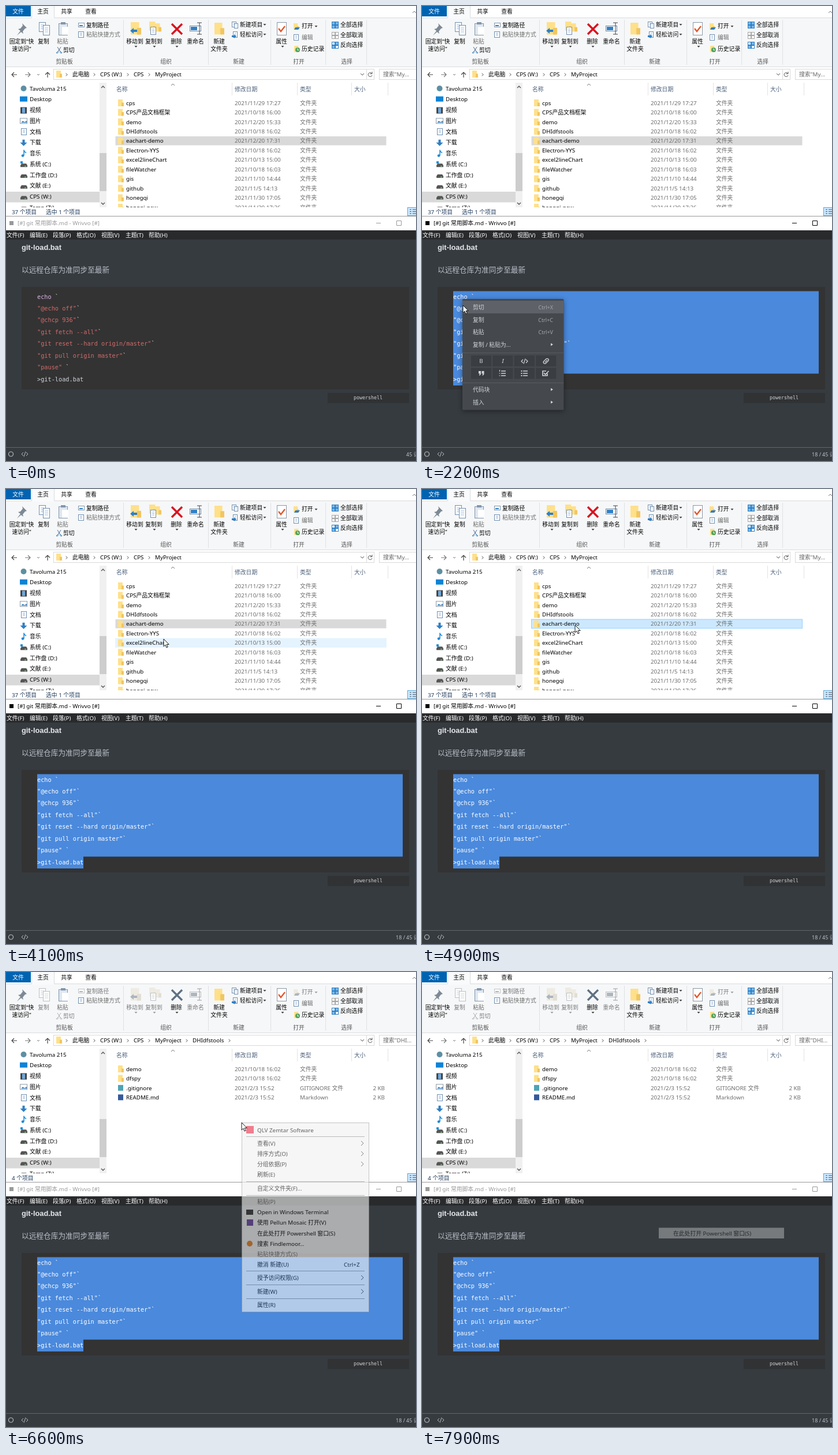
These frames come from a looping animation (710 px wide and 789 px high, 8 s). An HTML page:

```html
<!DOCTYPE html>
<html lang="zh-CN">
<head>
<meta charset="utf-8">
<title>Copy a script into a project folder</title>
<style>
html, body { margin: 0; width: 100%; height: 100%; overflow: hidden; background: #fff; }
svg { display: block; }
text { font: 9.8px "Noto Sans", "Noto Sans CJK SC", sans-serif; white-space: pre; }
.code { font: 10.25px "DejaVu Sans Mono", monospace; }
.lang { font: 8.3px "DejaVu Sans Mono", monospace; }
.head { font: bold 12.8px "Liberation Sans", sans-serif; }
.para { font-size: 12.7px; }
.small { font-size: 9px; }
.off { filter: grayscale(.8); opacity: .5; }
</style>
</head>
<body>
<script>
const LOOP = 8000, ROW = 16.45, LINE = 20.43;
const BLUE = '#2f7fc4', GRAY = '#6d6d6d', MID = 'text-anchor="middle"', END = 'text-anchor="end"';

const R = (x, y, w, h, fill, more = '') => `<rect x="${x}" y="${y}" width="${w}" height="${h}" fill="${fill}" ${more}/>`;
const T = (x, y, s, fill = '#000', more = '') => `<text x="${x}" y="${y + 3.6}" fill="${fill}" ${more}>${s}</text>`;
const P = (d, stroke, w = 1, fill = 'none') => `<path d="${d}" stroke="${stroke}" stroke-width="${w}" fill="${fill}"/>`;
const F = (d, fill) => P(d, 'none', 0, fill);
const C = (x, y, r, fill) => `<circle cx="${x}" cy="${y}" r="${r}" fill="${fill}"/>`;
const G = (id, body, more = '') => `<g id="${id}" ${more}>${body}</g>`;
const caret = (x, y, fill = '#444') => F(`M${x - 2.5} ${y - 1}h5l-2.5 3z`, fill);
const chevron = (x, y, s = 2.5, c = '#555') => P(`M${x - s / 2} ${y - s}l${s} ${s}l${-s} ${s}`, c);
const down = (x, y) => P(`M${x - 3} ${y - 1}l3 3l3 -3`, '#555');
const folder = (x, y, s = 1) => `<g transform="translate(${x} ${y}) scale(${s})">${
  R(0, 0, 8, 12, '#ffe08a')}${R(6, 5.5, 4, 6.5, '#f1c65f')}</g>`;
const page = (x, y, w, h, c = '#6f8fb0') => R(x + .5, y + .5, w, h, '#fff', `stroke="${c}"`) +
  [.3, .5, .7].map(k => P(`M${x + 3} ${y + h * k}h${w - 5}`, '#9dbbe0')).join('');

function ribbon() {
  const label = (x, y, s, c) => T(x, y, s, c, MID);
  const grid = (y, fills) => fills.map((f, i) =>
    R(564.5 + i % 2 * 6, y + (i >> 1) * 6, 5, 5, f, `stroke="${BLUE}"`)).join('');
  const arrow = (x, y) => F(`M${x} ${y}l6 -5v3h6v4h-6v3z`, BLUE);
  return R(0, 0, 710, 20, '#fff') + R(0, 20, 710, 85, '#f6f7f8') +
    P('M0 20.5H44.5V0M83.5 0V20.5H710M0 105.5H710', '#dadbdc') + R(45, 0, 38, 22, '#f9fafb') +
    R(0, 0, 43, 18, '#0063b1') + label(21, 9, '文件', '#fff') + label(64, 9, '主页') +
    label(105, 9, '共享') + label(147, 9, '查看') + P('M704 12l3 -3l3 3', '#777') +
    [203, 350, 458, 553, 624].map(x => P(`M${x + .5} 24V102`, '#e0e1e3')).join('') +
    [[101, '剪贴板'], [277, '组织'], [403, '新建'], [507, '打开'], [590, '选择']].map(([x, s]) => label(x, 96, s, '#555')).join('') +
    F('M28 30l8 8l-3 1l-4 5l1 4l-4 -3l-7 6l6 -8l-4 -3l4 -1l4 -5z', '#7d8995') +
    label(27, 61, '固定到“快') + label(27, 74, '速访问”') +
    R(91.5, 30.5, 15, 20, '#dfe7f0', 'stroke="#8296ad"') + R(95, 28, 8, 4, '#8296ad') + R(97, 36, 11, 14, '#fff') +
    label(98, 61, '粘贴', GRAY) + page(125, 44, 9, 10) + T(139, 49, '粘贴快捷方式', GRAY) +
    G('tools',
      page(57, 28, 11, 16) + page(64, 33, 11, 17) + label(65, 61, '复制') +
      P('M89 71l5 8M95 71l-5 8', '#4c6a88') + P('M87 81a1.8 1.8 0 1 0 3 -2zM94 79a1.8 1.8 0 1 0 3 2z', BLUE) + T(99, 76, '剪切') +
      R(125.5, 29.5, 10, 7, '#fff', 'stroke="#7f96ae"') + P('M127 34h6', BLUE, 2) + T(139, 33, '复制路径') +
      folder(216, 28, 1.8) + arrow(215, 43) + label(223, 61, '移动到') + caret(225, 70) +
      folder(248, 27, 1.3) + folder(257, 30, 1.2) + page(250, 36, 9, 13) + label(256, 61, '复制到') + caret(257, 70) +
      R(318.5, 34.5, 19, 9, '#fff', 'stroke="#6d87a3"') + R(320, 36, 11, 6, BLUE) +
      P('M331 29h8M335 29v20M331 49h8', '#444') + label(328, 61, '重命名') +
      folder(498, 30, .9) + F('M501 37h8l-3 4h-7z', BLUE) + T(512, 34, '打开') + caret(537, 35)) +
    '<path id="cross" d="M287 31L305 49M305 31L287 49" stroke-width="3.4"/>' + label(295, 61, '删除') + caret(296, 70) +
    folder(361, 29, 1.7) + label(369, 61, '新建') + label(369, 74, '文件夹') +
    page(391, 27, 7, 9) + page(395, 30, 6, 8) + T(405, 32, '新建项目') + caret(448, 32) +
    page(393, 44, 7, 10) + F('M391 51h4v-2l4 3.500l-4 3.500v-2h-4z', BLUE) + T(405, 49, '轻松访问') + caret(448, 49) +
    R(469.5, 28.5, 16, 22, '#fff', 'stroke="#8a97a5"') + P('M472 39l4 5l7 -9', '#e2572b', 2.4) + label(477, 61, '属性') + caret(479, 70) +
    page(498, 49, 8, 10) + T(512, 54, '编辑', GRAY) +
    folder(499, 69, .9) + C(505, 76, 4, '#53a35b') + P('M505 73.500v3h2', '#fff') + T(512, 74, '历史记录') +
    grid(27.5, Array(4).fill('#79b8ea')) + T(579, 32, '全部选择') +
    grid(45.5, Array(4).fill('#fff')).replaceAll(BLUE, '#a5a5a5') + T(579, 50, '全部取消') +
    grid(62.5, ['#fff', '#79b8ea', '#79b8ea', '#fff']) + T(579, 67, '反向选择');
}

function addressBar() {
  const crumbs = list => list.map(([x, s]) => T(x, 118, s)).join('');
  return P('M19 119H10M14 115l-4 4l4 4', '#444', 1.2) + P('M33 119h9M38 115l4 4l-4 4', '#777', 1.2) +
    P('M54 118l2 2l2 -2', '#777') + P('M72 124v-9M68 119l4 -4l4 4', '#444', 1.2) +
    R(82.5, 109.5, 555, 18, '#fff', 'stroke="#d9d9d9"') + P('M624.5 110v17', '#d9d9d9') +
    R(646.5, 109.5, 70, 18, '#fff', 'stroke="#d9d9d9"') + folder(87, 112) +
    [105, 153, 211, 248].map(x => chevron(x, 119)).join('') +
    crumbs([[115, '此电脑'], [163, 'CPS (W:)'], [221, 'CPS'], [258, 'MyProject']]) +
    G('crumb', chevron(313, 119) + T(323, 118, 'DHIdfstools') + chevron(387, 119)) +
    down(617, 118) + P('M633.5 117a3.500 3.500 0 1 0 .5 3M634 114v3.500h-3.500', '#555') +
    '<text id="search" x="653" y="121.6" fill="#666"></text>';
}

function tree() {
  const drive = y => F(`M27 ${y - 1}h8l2 3v3h-12v-3z`, '#555') + R(32, y + 3, 3, 1, '#7fe07f');
  const items = [
    ['Tavoluma 215', y => C(30.5, y, 5, '#5d8fa3')],
    ['Desktop', y => R(24, y - 5, 13, 9, '#0a84d8')],
    ['视频', y => R(25, y - 5, 11, 11, '#444') + R(28, y - 4, 5, 9, '#6fa8dc')],
    ['图片', y => R(24.5, y - 4.5, 12, 9, '#fff', 'stroke="#8b9aa8"') + F(`M26 ${y + 3}l3 -3l3 2l4 -2v3z`, BLUE)],
    ['文档', y => page(26, y - 6, 9, 11)],
    ['下载', y => F(`M28.5 ${y - 5}h4v5h4l-6 6l-6 -6h4z`, BLUE)],
    ['音乐', y => C(29, y + 4, 2.3, '#1689d8') + P(`M31 ${y + 4}v-10q0 3 4 5`, '#1689d8', 1.5)],
    ['系统 (C:)', y => R(25, y - 5, 4, 4, '#1689d8') + drive(y)],
    ['工作盘 (D:)', drive], ['文献 (E:)', drive], ['CPS (W:)', drive], ['Temp (Z:)', drive]];
  return R(0, 322, 162, 18.5, '#d9d9d9') +
    items.map(([s, icon], i) => icon(143 + i * 18.75) + T(41, 143 + i * 18.75, s)).join('') +
    R(162, 133, 12, 216, '#f0f0f0') + R(162, 255, 12, 66, '#cdcdcd') +
    P('M165 142l3 -3l3 3M165 341l3 3l3 -3', '#555', 1.4);
}

function fileRow(i, name, date, type = '文件夹', size = '', color) {
  const y = 168 + i * ROW;
  return (color ? R(194, y - 5, 9, 10, color) : folder(194, y - 6)) + T(208, y, name) +
    T(396, y, date, GRAY) + T(509, y, type, GRAY) + T(656, y, size, GRAY, END);
}

function fileList() {
  const project = [['cps', '11/29 17:27'], ['CPS产品文档框架', '10/18 16:00'], ['demo', '12/20 15:33'],
    ['DHIdfstools', '10/18 16:02'], ['eachart-demo', '12/20 17:31'], ['Electron-YYS', '10/18 16:02'],
    ['excel2lineChart', '10/13 15:00'], ['fileWatcher', '10/18 16:03'], ['gis', '11/10 14:44'],
    ['github', '11/5 14:13'], ['honegqi', '11/30 17:05'], ['hongqi-new', '11/30 17:36']];
  return [391, 504, 598, 661].map(x => P(`M${x + .5} 133V155`, '#e3e3e3')).join('') +
    P('M286 138l3 -3l3 3', '#777') +
    [[191, '名称'], [396, '修改日期'], [509, '类型'], [603, '大小']].map(([x, s]) => T(x, 144, s, '#4c607a')).join('') +
    R(189, 0, 470, ROW, '#e5f3ff', 'id="hover"') + R(189.5, 0, 469, ROW - 1, '#d9d9d9', 'id="picked"') +
    G('outer', project.map(([n, d], i) => fileRow(i, n, '2021/' + d)).join('')) +
    G('inner', fileRow(0, 'demo', '2021/10/18 16:02') + fileRow(1, 'dfspy', '2021/10/18 16:02') +
      fileRow(2, '.gitignore', '2021/2/3 15:52', 'GITIGNORE 文件', '2 KB', '#4fa3b5') +
      fileRow(3, 'README.md', '2021/2/3 15:52', 'Markdown', '2 KB', '#34589b'));
}

function editor() {
  const red = s => `<tspan fill="#d26b6b">"${s}"</tspan>`;
  const lines = ['<tspan fill="#dcb4ea">echo</tspan> `', ...['@echo off', '@chcp 936', 'git fetch --all',
    'git reset --hard origin/master', 'git pull origin master'].map(s => red(s) + '`'), red('pause') + ' `', '&gt;git-load.bat'];
  const code = fill => lines.map((s, i) =>
    T(54, 504 + i * LINE, fill ? s.replace(/<.*?>/g, '') : s, fill || '#cfd5db', 'class="code"')).join('');
  const menus = [[1, '文件(F)'], [41, '编辑(E)'], [81, '段落(P)'], [122, '格式(O)'], [165, '视图(V)'], [207, '主题(T)'], [247, '帮助(H)']];
  return R(0, 349, 710, 15, '#fff') + '<text id="count" x="10" y="360.6" fill="#1e395b"></text>' +
    G('chosen', T(69, 357, '选中 1 个项目', '#1e395b')) +
    R(695.5, 349.5, 20, 14, '#cce8ff', 'stroke="#5aa7dc"') +
    P('M699 353h3M699 356.500h3M699 360h3M704 353h6M704 356.500h6M704 360h6', '#456', 1.2) +
    R(0, 364, 710, 25, '#fff') + P('M0 364.5H710', '#999') +
    G('caption', R(6, 373, 7, 7, 'currentColor') + T(20, 376, '[#] git 常用脚本.md - Wrivvo [#]', 'currentColor') +
      P('M641 376.5h8M676.5 372.5h8v8h-8z', 'currentColor')) +
    R(0, 389, 710, 16, '#292a2c') + menus.map(([x, s]) => T(x, 397, s, '#fff')).join('') +
    R(0, 405, 710, 384, '#363b40') +
    T(27, 419, 'git-load.bat', '#e4e7ea', 'class="head"') + T(27, 458.4, '以远程仓库为准同步至最新', '#b8bfc6', 'class="para"') +
    R(27, 487, 671, 178, '#333') + R(557, 671, 141, 17.5, '#303234') +
    T(627, 678.6, 'powershell', '#cfd3d6', 'class="lang" ' + MID) +
    code() + '<clipPath id="clip"><path id="clipShape"/></clipPath><path id="mark" fill="#4a89dc"/>' +
    `<g clip-path="url(#clip)">${code('#fff')}</g>` +
    P('M0 765.5H710', '#62676c') + P('M4.500 777a4 4 0 1 0 8 0a4 4 0 1 0 -8 0', '#b8bfc6', 1.2) +
    P('M30 774l-3 3l3 3M35 774l3 3l-3 3M34 772.500l-3 9', '#b8bfc6') +
    G('words', T(675, 777, '18 /', '#b8bfc6', 'class="small"')) + T(693, 777, '45 词', '#b8bfc6', 'class="small"');
}

function editMenu() {
  const ink = '#d0d4d8', item = (y, s, key) => T(88, y, s, ink) +
    (key ? T(227, y, key, '#a3a7ab', 'class="small" ' + END) : F(`M223 ${y - 2.5}l4 2.500l-4 2.500z`, ink));
  const bars = (x, y) => P([-4, 0, 4].map(d => `M${x - 2} ${y + d}h8`).join(''), ink, 1.5);
  const cells = [0, 1, 2, 3, 4, 5, 6, 7].map(i => R(85 + i % 4 * 37.4, 606 + (i >> 2) * 21.500, 35, 19, '#3a3d41')).join('');
  const dots = P('M171.500 633h2M171.500 637h2M171.500 641h2', ink, 2);
  const digits = P('M134.500 631v3M135.500 637h-2M135.500 641h-2', ink, 1.2);
  return R(70, 508, 175.5, 192.5, '#45494e', 'rx="2" style="filter:drop-shadow(0 2px 4px #0006)"') +
    R(70, 511, 175.5, 22, '#5e6268', 'id="editHover"') +
    item(522, '剪切', 'Ctrl+X') + item(544, '复制', 'Ctrl+C') + item(565, '粘贴', 'Ctrl+V') + item(587, '复制 / 粘贴为...') +
    P('M70 601.5h175M70 653.5h175', '#585c61') + cells +
    T(102.5, 615.5, 'B', ink, MID) + T(140, 615.5, 'I', ink, 'font-style="italic" style="font-style:italic;font-family:Noto Serif,serif" ' + MID) +
    P('M175 613l-3 3l3 3M180 613l3 3l-3 3M179 611.500l-3 9', ink, 1.2) +
    P('M213 618l4 -4M213 614l2 -2a2.300 2.300 0 0 1 3.500 3.500l-2 2M216.500 617.500l-2 2a2.300 2.300 0 0 1 -3.500 -3.500l2 -2', ink, 1.3) +
    F('M98 633h4v5q0 2 -3 3v-1.500q1 -.5 1 -2h-2zM103.500 633h4v5q0 2 -3 3v-1.500q1 -.5 1 -2h-2z', ink) +
    digits + bars(139, 637) + dots + bars(177, 637) +
    P('M217 637v4h-8v-8h6M211 636l2.500 3l6 -6', ink, 1.6) + item(665, '代码块') + item(687, '插入');
}

// label, centre y, then '>' for a submenu, '-' for disabled, or a shortcut
const FOLDER_MENU = [['QLV Zemtar Software', 274], ['查看(V)', 297, '>'], ['排序方式(O)', 315, '>'], ['分组依据(P)', 333, '>'],
  ['刷新(E)', 351], ['自定义文件夹(F)...', 375], ['粘贴(P)', 398, '-'], ['Open in Windows Terminal', 416],
  ['使用 Pellun Mosaic 打开(V)', 434], ['在此处打开 Powershell 窗口(S)', 453], ['搜索 Findlemoor...', 471],
  ['粘贴快捷方式(S)', 489, '-'], ['撤消 新建(U)', 507, 'Ctrl+Z'], ['授予访问权限(G)', 530, '>'], ['新建(W)', 554, '>'], ['属性(R)', 577]];

function folderMenu() {
  return R(408.5, 261.5, 220, 328, '#f2f2f2', 'stroke="#a0a0a0"') + R(410, 0, 217, 18, '#fff', 'id="folderHover"') +
    [285, 363, 387, 518, 542, 566].map(y => P(`M416 ${y + .5}H621`, '#8f8f8f')).join('') +
    FOLDER_MENU.map(([s, y, kind = '']) => T(435, y, s, kind === '-' ? GRAY : '#000') +
      (kind === '>' ? chevron(617, y, 4, '#333') : kind.length > 1 ? T(585, y, kind) : '')).join('') +
    R(416, 267, 13, 13, '#e8304a') + R(416, 412, 12, 9, '#333') + R(417, 429, 11, 11, '#68429a') + C(422, 471, 5, '#e57e22');
}

document.body.innerHTML = `<svg width="710" height="789" viewBox="0 0 710 789">${
  R(0, 0, 710, 789, '#fff') + ribbon() + addressBar() + tree() + fileList() + editor() + G('editMenu', editMenu()) +
  G('folderMenu', folderMenu()) + G('leftover', R(410, 443.5, 217, 18.5, '#fff') + T(435, 453, FOLDER_MENU[9][0])) +
  G('beam', P('M-2.500 -6.500h2l.5 .5l.5 -.5h2M0 -6v12M-2.500 6.500h2l.5 -.5l.5 .5h2', '#ddd')) +
  G('arrow', P('M0 0V13L3 10.300L5 15L7.200 14L5.200 9.500H9.200Z', '#000', .9, '#fff'))}</svg>`;

const $ = id => document.getElementById(id);
const set = (id, attrs) => { for (const k in attrs) $(id).setAttribute(k, attrs[k]); };
const show = (id, on) => set(id, { display: on ? 'inline' : 'none' });

// each key: time, x, y
const BEAM = [[100, 250, 600], [500, 134, 648], [1000, 92, 542], [1400, 54, 501], [1800, 60, 514]];
const HEAD = [[500, 134, 647], [700, 128, 627], [1000, 97, 565], [1400, 54, 504]];
const ARROW = [[1900, 71, 519], [2200, 71, 519], [2600, 110, 571], [3000, 104, 545], [3100, 104, 545], [3900, 280, 276],
  [4000, 280, 276], [4100, 273, 260], [4300, 270, 246], [4500, 270, 246], [4900, 265, 236], [5400, 267, 214],
  [5800, 267, 214], [6200, 389, 260], [6400, 389, 260], [6500, 408, 261], [6900, 408, 261], [7400, 470, 451]];

function at(keys, t) {
  const i = keys.findIndex(k => k[0] > t);
  if (i < 1) return keys.at(i).slice(1);
  const [a, ...p] = keys[i - 1], [b, ...q] = keys[i];
  return p.map((v, j) => v + (q[j] - v) * (t - a) / (b - a));
}

function selection(t) {
  if (t < 600) return 'M0 0';
  const [x, y] = at(HEAD, t), line = Math.round((y - 504) / LINE), top = 494.5 + line * LINE, last = 494.5 + 7 * LINE;
  if (line === 7) return `M${x} ${last}H134V658H${x}Z`;
  return `M${x} ${top}H687V${last}H134V658H54V${top + LINE}H${x}Z`;
}

function render(t) {
  const opened = t >= 5500, [x, y] = at(ARROW, t);
  $('tools').classList.toggle('off', opened);
  set('cross', { stroke: opened ? '#5f7184' : '#d9101e' });
  for (const id of ['crumb', 'inner']) show(id, opened);
  for (const id of ['outer', 'chosen', 'picked']) show(id, !opened);
  $('search').textContent = opened ? '搜索"DHI...' : '搜索"My...';
  $('count').textContent = opened ? '4 个项目' : '37 个项目';
  set('caption', { color: t >= 300 && t < 5000 ? '#000' : '#999' });

  const row = Math.floor((y - 168 + ROW / 2) / ROW), over = t >= 3100 && !opened && y < 349;
  const picked = t < 5300 ? 4 : 3, lit = t >= 4800 || over && row === picked;
  show('hover', over);
  set('hover', { y: 168 + (row - .5) * ROW });
  set('picked', { y: 168.5 + (picked - .5) * ROW, fill: lit ? '#cce8ff' : '#d9d9d9', stroke: lit ? '#99d1ff' : 'none' });

  const shape = selection(t);
  set('mark', { d: shape });
  set('clipShape', { d: shape });
  show('words', t >= 1500);

  show('editMenu', t >= 1900 && t < 3100);
  set('editHover', { y: 511 + 21.7 * Math.floor((y - 511) / 21.7) });

  show('folderMenu', t >= 6500 && t < 7600);
  set('folderMenu', { opacity: t < 6600 ? .3 : t < 7000 ? .62 : t < 7500 ? 1 : .4 });
  const target = FOLDER_MENU.find(m => Math.abs(m[1] - y) <= 9);
  show('folderHover', t >= 7000 && target);
  if (target) set('folderHover', { y: target[1] - 9 });
  show('leftover', t >= 7500);
  set('leftover', { opacity: t < 7600 ? .9 : t < 7900 ? .6 : .32 });

  show('beam', t >= 100 && t < 1900);
  set('beam', { transform: `translate(${at(BEAM, t)})` });
  show('arrow', t >= 1900 && t < 7500);
  set('arrow', { transform: `translate(${x},${y})` });
}

function tick() {
  render(Math.floor(performance.now() % LOOP / 100) * 100);
  requestAnimationFrame(tick);
}
tick();
</script>
</body>
</html>
```
